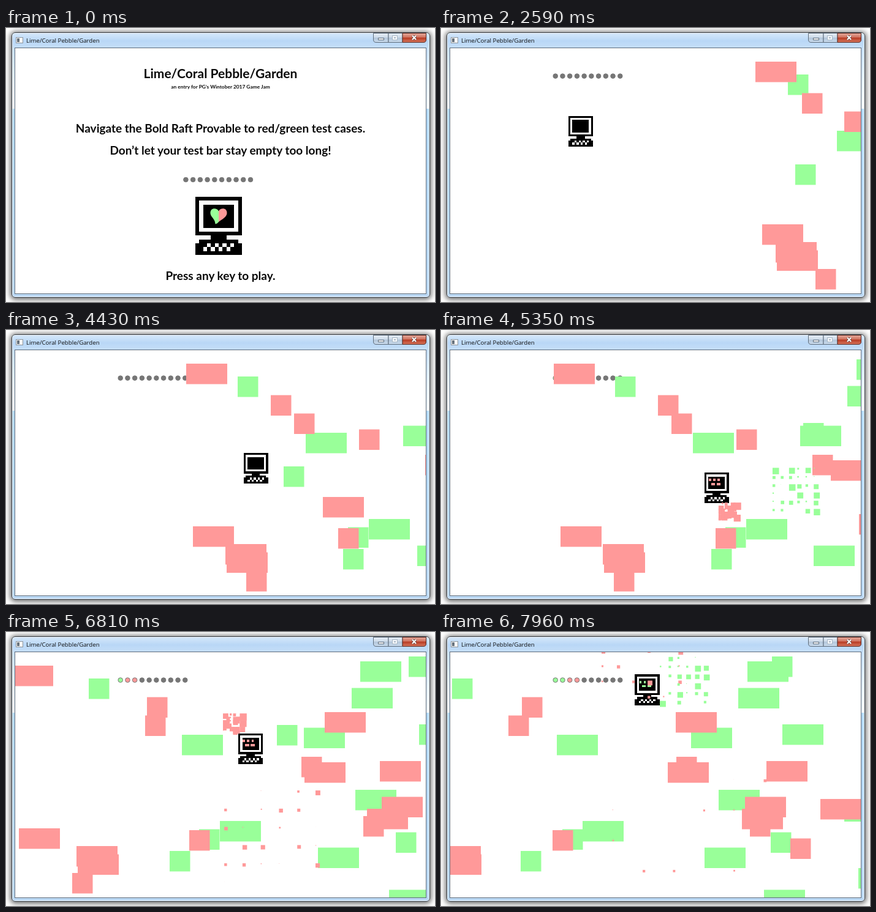
Write an HTML page with a canvas that moves like this. It is 700 by 448 pixels and loops after 8000 ms.

```html
<!DOCTYPE html>
<html lang="en">
<head>
<meta charset="utf-8">
<title>Lime/Coral Pebble/Garden</title>
<style>
  html, body { margin: 0; width: 100%; height: 100%; overflow: hidden; background: #fff; }
  .stage { position: relative; width: 700px; height: 448px; overflow: hidden; }
  .window {
    position: absolute; left: 9px; top: 7px; width: 683px; height: 434px; box-sizing: border-box;
    border: 1px solid #343b42; border-radius: 6px;
    box-shadow: inset 0 0 0 1px rgba(255,255,255,.75), 0 1px 9px 2px rgba(0,0,0,.6);
    background: linear-gradient(#d6e8fa 0, #b9d7f6 13px, #c6dff8 25px, #e4f0fb 80px, #f3f8fd 124px, #b4daf9 124px, #bcd9f5 100%);
  }
  svg, canvas { position: absolute; left: 0; top: 0; }
  canvas { left: 15px; top: 33px; }
  .caption { font: 9.7px "Open Sans", "Noto Sans", sans-serif; fill: #111; }
  .title { font: bold 19px Lato, sans-serif; text-anchor: middle; fill: #0a0a0a; }
</style>
</head>
<body>
<div class="stage">
  <div class="window"></div>
  <svg width="700" height="448" viewBox="0 0 700 448">
    <defs>
      <linearGradient id="glass" x2="0" y2="1">
        <stop offset="0" stop-color="#e6eef6"/><stop offset=".45" stop-color="#cfdcea"/>
        <stop offset=".5" stop-color="#b3c6da"/><stop offset="1" stop-color="#cadcee"/>
      </linearGradient>
      <linearGradient id="shut" x2="0" y2="1">
        <stop offset="0" stop-color="#e5aa9c"/><stop offset=".45" stop-color="#d0725f"/>
        <stop offset=".5" stop-color="#b73a22"/><stop offset="1" stop-color="#d7775e"/>
      </linearGradient>
    </defs>
    <rect x="14.5" y="32.5" width="671" height="402" fill="#fff" stroke="#5d6b7a"/>
    <rect x="16.5" y="15.5" width="11" height="9" fill="#f6f6f6" stroke="#8f979f"/>
    <rect x="18" y="17" width="4" height="6" fill="#67727c"/>
    <text class="caption" x="33" y="23.5">Lime/Coral Pebble/Garden</text>
    <g stroke="#5f6d7c">
      <path d="M599.5 8.5H624V23.5H604Q599.5 23.5 599.5 19Z" fill="url(#glass)"/>
      <path d="M624 8.5H647V23.5H624Z" fill="url(#glass)"/>
      <path d="M647 8.5H685.5V19Q685.5 23.5 681 23.5H647Z" fill="url(#shut)" stroke="#5b2a22"/>
      <rect x="607.5" y="16.5" width="9" height="3" fill="#fff"/>
      <rect x="630.5" y="12.5" width="8" height="7" fill="#f4f7fa" stroke="#a9b7c5"/>
      <rect x="633.5" y="15.5" width="2" height="1" fill="none" stroke="#a9b7c5"/>
    </g>
    <path d="M663 12.5L669 19M669 12.5L663 19" stroke="#5b3a38" stroke-width="3.6"/>
    <path d="M663 12.5L669 19M669 12.5L663 19" stroke="#fff" stroke-width="2.2"/>
  </svg>
  <canvas id="view" width="670" height="401"></canvas>
  <svg id="intro" width="700" height="448" viewBox="0 0 700 448">
    <g class="title">
      <text x="350" y="82" style="font-size:21px">Lime/Coral Pebble/Garden</text>
      <text x="350" y="99" style="font-size:8.4px">an entry for PG’s Wintober 2017 Game Jam</text>
      <text x="350" y="171">Navigate the Bold Raft Provable to red/green test cases.</text>
      <text x="350" y="207">Don’t let your test bar stay empty too long!</text>
      <text x="350" y="411.5">Press any key to play.</text>
    </g>
    <path d="M347 299.5C344 293.5 333 293.5 333.5 303C334 310 341 311 341.500 320.5C344 320 346 318.5 347 317Z" fill="#9f9"/>
    <path d="M347 299.5C350 293.5 361 293.5 360.5 303C360 309 353 312.5 347 317Z" fill="#f99"/>
  </svg>
</div>
<script>
const LOOP = 8000, START = 500, FIRST = 1050, STEP = 76.78;
const TICKS = 1.306; // game ticks per shown step
const RED = '#ff9999', GREEN = '#99ff99', GREY = '#767676';
const SMALL = 33.5, WIDE = 67, MID = 56;
const ctx = document.getElementById('view').getContext('2d');
const intro = document.getElementById('intro');
ctx.translate(-15, -33);

// Blocks of one kind share a speed; each has its place at step MID.
const blocks = [];
function add(color, w, speed, ...places) {
  for (const [x, y] of places) blocks.push({ color, w, speed, x, y });
  return blocks[blocks.length - 1];
}
// A hit block bursts at a given step, and the pieces drift.
const bursts = [];
function hit(block, at, vx, vy) {
  block.end = at;
  bursts.push({ block, at, vx, vy });
}

hit(add(GREEN, SMALL, 4, [390, 223]), 45.7, 8.7, 1.65);
add(GREEN, SMALL, 5, [760, 327.5]);
add(GREEN, SMALL, 6, [284, 76], [464, 322.5], [806, 40]);
add(GREEN, SMALL, 7, [440.5, 358]);
add(GREEN, WIDE, 4, [585.5, 156.5], [608, 352.5], [677.5, 48], [663, 91.5]);
add(GREEN, WIDE, 5, [411, 168], [749, 421.5], [880, 276.5], [903, 386]);
add(GREEN, WIDE, 6, [497.5, 309], [823, 151], [719, 258]);

hit(add(RED, WIDE, 7, [407, 273]), 52.2, -1.4, 1.57);
hit(add(RED, SMALL, 6, [482, 162.5]), 70.8, -2.2, -5.36);
hit(add(GREEN, SMALL, 6, [591, 152]), 79, -2.2, -6.2);
add(RED, SMALL, 4, [682, 301]);
add(RED, SMALL, 5, [354, 106.5], [606, 204]);
add(RED, SMALL, 6, [376, 136.5], [448, 324]);
add(RED, SMALL, 7, [282, 394], [881, 337.5]);
add(RED, WIDE, 4, [709, 211]);
add(RED, WIDE, 5, [713, 289], [841, 273]);
add(RED, WIDE, 6, [264, 350], [265.5, 363.5], [636, 213], [762, 269.5]);
add(RED, WIDE, 7, [184, 55], [195, 321], [694, 131]);

const blockX = (b, n) => b.x - b.speed * TICKS * (n - MID);

function random(seed) {
  const v = Math.sin(seed * 12.9898) * 43758.5453;
  return v - Math.floor(v);
}

// Turning points of the ship: step, x, y.
const path = [
  [0, 98, 98], [8, 121, 116.5], [32, 294.5, 171], [44, 387.5, 201], [50, 430, 217],
  [56, 429.5, 233], [63, 410, 246], [71, 390, 197], [75, 379, 166], [91, 312, 63],
];
function shipAt(n) {
  const step = Math.max(0, n);
  const i = path.findIndex(p => p[0] > step);
  const [n0, x0, y0] = path[i - 1], [n1, x1, y1] = path[i];
  const f = (step - n0) / (n1 - n0);
  return [x0 + (x1 - x0) * f, y0 + (y1 - y0) * f];
}

function box(color, x, y, w, h) {
  ctx.fillStyle = color;
  ctx.fillRect(x, y, w, h);
}

function computer(x, y, u, code) {
  const px = (color, a, b, w, h) => {
    const left = Math.round(x + a * u), top = Math.round(y + b * u);
    box(color, left, top, Math.round(x + (a + w) * u) - left, Math.round(y + (b + h) * u) - top);
  };
  px('#000', 0, 0, 12, 10);
  px('#fff', 1, 1, 10, 8);
  px('#000', 2, 2, 8, 6);
  px('#000', 4, 10, 4, 1);
  px('#000', 1, 11, 10, 1);
  px('#000', 0, 12, 12, 3);
  for (let i = 2; i < 10; i++) px('#fff', i, i % 2 ? 12 : 13, 1, 1);
  if (!code) return;
  for (let i = 0; i < 3; i++) px(code, 2.2 + i * 2.1, 3.1, 1.1, 1.1);
  for (let i = 0; i < 2; i++) px(code, 3.4 + i * 2.7, 5.1, 1.9, 1.1);
}

function dots(x, y, colors) {
  ctx.strokeStyle = GREY;
  for (let i = 0; i < 10; i++) {
    ctx.beginPath();
    ctx.arc(x + i * 11.73, y, 3.8, 0, 7);
    ctx.fillStyle = colors[i] || GREY;
    ctx.fill();
    ctx.stroke();
  }
}

// 6 by 6 pieces spread by one pixel per tick and shrink away.
function drawBurst({ block, at, vx, vy }, n) {
  const age = (n - at) * TICKS;
  const x = blockX(block, at) + block.w / 2 - 3 + vx * age;
  const y = block.y + SMALL / 2 - 3 + vy * age;
  for (let i = 0; i < 36; i++) {
    const size = 13 * random(i + at) - age / 6;
    if (size > 0) box(block.color, x + (i % 6 - 2.5) * age, y + (Math.floor(i / 6) - 2.5) * age, size, size);
  }
}

function drawGame(n) {
  const hits = bursts.filter(b => n >= b.at);
  const colors = hits.map(b => b.block.color);
  dots(186.7, 78.6, [GREEN, RED].flatMap(c => colors.filter(d => d === c)));
  computer(...shipAt(n), 3.36, colors[colors.length - 1]);
  for (const b of blocks) {
    if (!(n >= b.end)) box(b.color, Math.round(blockX(b, n)), b.y, b.w, SMALL);
  }
  for (const b of hits) drawBurst(b, n);
}

function draw(t) {
  const playing = t >= START;
  intro.style.display = playing ? 'none' : '';
  box('#fff', 15, 33, 670, 401);
  if (playing) {
    drawGame(Math.max(-1, Math.floor((t - FIRST + 6) / STEP)));
  } else {
    dots(293.4, 248, []);
    computer(309, 276, 6.33);
  }
}

const begin = performance.now();
function frame() {
  draw((performance.now() - begin) % LOOP);
  requestAnimationFrame(frame);
}
frame();
</script>
</body>
</html>
```
